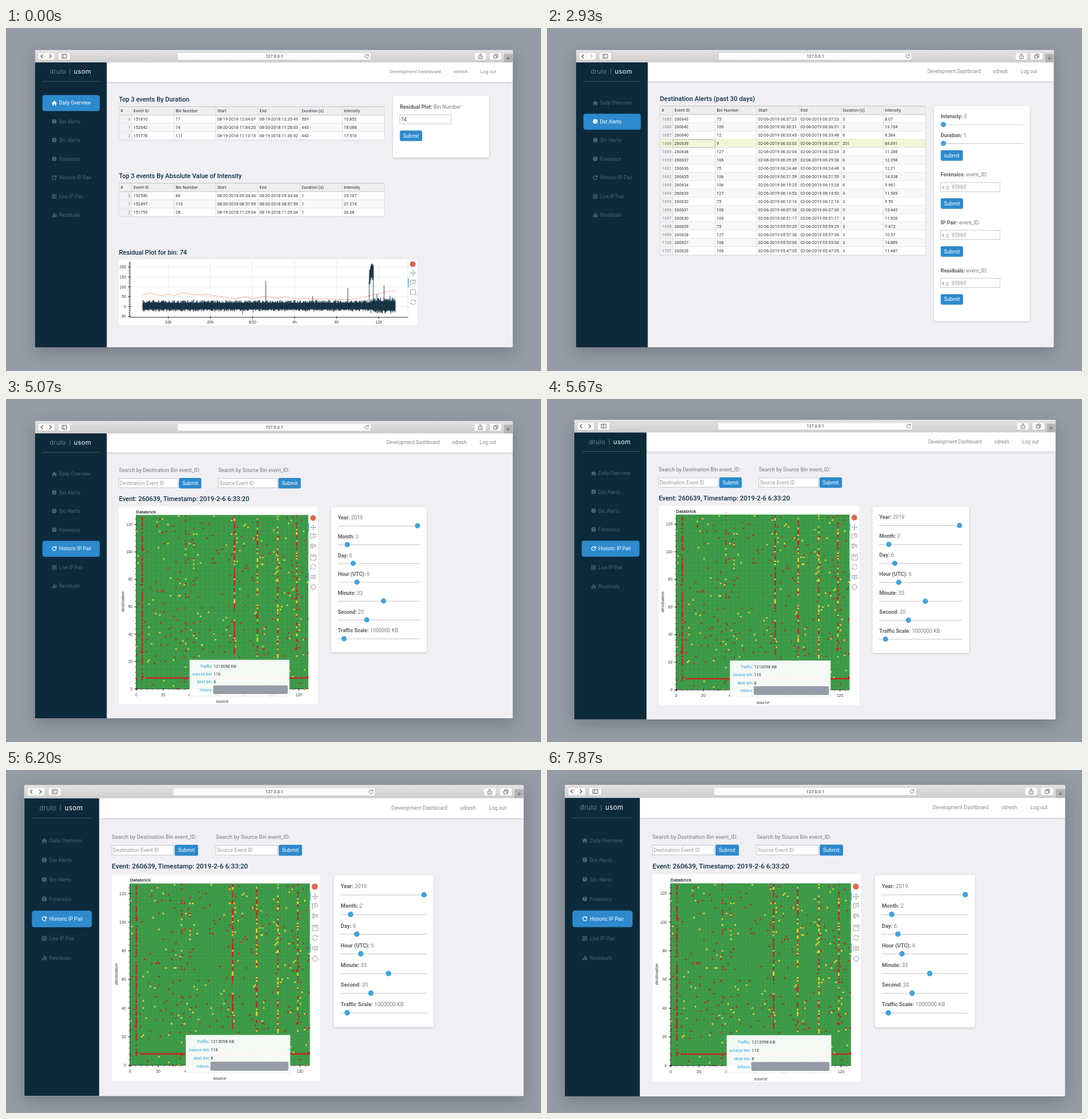
An HTML page that plays this animation: 900 by 578 pixels, repeating every 7.94 s.

```html
<!DOCTYPE html>
<html lang="en">
<head>
<meta charset="utf-8">
<title>Network dashboard</title>
<style>
  html, body { margin: 0; width: 100%; height: 100%; overflow: hidden; background: #969ca5; }
  svg { display: block; width: 100vw; height: 100vh; font-family: Roboto, sans-serif; }
  .plot { font-family: "Liberation Sans", Arial, sans-serif; }
  .logo { font-family: Inter, sans-serif; letter-spacing: .3px; }
  .card { filter: drop-shadow(0 1px 1.5px rgba(0,0,0,.2)); }
  .window { filter: drop-shadow(0 8px 13px rgba(20,30,45,.27)); }
</style>
</head>
<body>
<svg id="stage" viewBox="0 0 900 578"></svg>
<script>
const LOOP = 7940, SWITCHES = [770, 3070, 4670];
const ZOOM_START = 5444, ZOOM_TIME = 870, ZOOM = 0.0475;
const NAVY = '#0c2a3a', BLUE = '#2d8acd', KNOB = '#41a3da', DIM = '#4a6574';
const GREY = '#777b80', INK = '#33373b', BAR = '#979da6';

let seed = 7;
const rand = () => (seed = (seed * 1664525 + 1013904223) % 4294967296) / 4294967296;
const range = (n, f) => Array.from({ length: n }, (_, i) => f(i)).join('');

// y is the middle of the capital letters
const text = (x, y, s, size = 7.1, fill = INK, more = '') =>
  `<text x="${x}" y="${y + size * .355}" font-size="${size}" fill="${fill}" ${more}>${s}</text>`;
const rect = (x, y, x2, y2, fill, more = '') =>
  `<rect x="${x}" y="${y}" width="${x2 - x}" height="${y2 - y}" fill="${fill}" ${more}/>`;
const path = (d, stroke, width = 1, more = 'fill="none"') =>
  `<path d="${d}" stroke="${stroke}" stroke-width="${width}" ${more}/>`;
const dot = (x, y, r, fill) => `<circle cx="${x}" cy="${y}" r="${r}" fill="${fill}"/>`;
const BOLD = ' font-weight="700"', MID = 'text-anchor="middle"', END = 'text-anchor="end"';

const heading = (x, y, s, size = 10.9) => text(x, y, s, size, '#0c3144', 'font-weight="500"');
const card = (x, y, x2, y2) => rect(x, y, x2, y2, '#fff', 'rx="3" class="card"');
const button = (x, y, s = 'Submit', w = 37.6) =>
  rect(x, y, x + w, y + 17.7, BLUE, 'rx="2.5"') + text(x + w / 2, y + 8.8, s, 8.5, '#fff', MID);
const input = (x, y, w, s, fill = '#999') =>
  rect(x, y, x + w, y + 15.5, '#fff', 'stroke="#c3c4c8" stroke-width=".9"') + text(x + 1.8, y + 7.8, s, 8.3, fill);
const label = (x, y, name, value) =>
  text(x, y, `<tspan font-weight="700" fill="#5c6064">${name}:</tspan> ${value}`, 8.75, GREY);
const slider = (x, y, w, knob) => path(`M${x} ${y}h${w}`, '#cfcfd3', 1.2) + dot(knob, y - .3, 4.4, KNOB);

const ICONS = {
  pan: 'M-4.5 0h9M0-4.5v9M-3-1.5l-1.5 1.5 1.5 1.5M3-1.5l1.5 1.5-1.5 1.5M-1.5-3l1.5-1.5 1.5 1.5M-1.5 3l1.5 1.5 1.5-1.5',
  zoom: 'M-3 4h-1.5v-8h8.5M4.5-.8a2.6 2.6 0 1 0-5.2 0a2.6 2.6 0 1 0 5.2 0M0 1l-3 3.2',
  wheel: 'M-.5-3.5h-4v6h3M1-1.5a2 2 0 1 0-4 0a2 2 0 1 0 4 0M4.5-1.5a1.6 1.6 0 1 0-3.2 0a1.6 1.6 0 1 0 3.2 0M-1 .5l-1 3.5M3 0v3',
  box: 'M1 4h-5.5v-8h8v5M2 3.5h4M4 1.5v4',
  save: 'M-4.5-4.5h9v9h-9zM-2-4.5v3h4v-3',
  reset: 'M-4-.8a4 4 0 0 1 7.5-1.2M4 .8a4 4 0 0 1-7.5 1.2M4.3-3.5v2h-2M-4.3 3.5v-2h2',
  hover: 'M-4-3h8v5.5h-3l-1 1.5-1-1.5h-3zM-2-1.2h4M-2 .6h4',
  cross: 'M4 0a4 4 0 1 0-8 0a4 4 0 1 0 8 0M-5 0h2M3 0h2M0-5v2M0 3v2'
};
const icon = (name, x, y) =>
  `<g transform="translate(${x} ${y})">${path(ICONS[name], '#8f9296', .8)}</g>`;

function browser() {
  const box = (x, x2) => rect(x, 41.3, x2, 53.8, '#fbfbfb', 'rx="2" stroke="#c2c2c2" stroke-width=".5"');
  return rect(49, 37, 852.5, 538, '#f0eff4', 'rx="1.5" class="window"') +
    rect(49, 37, 852.5, 58, 'url(#chrome)', 'rx="1.5"') + rect(838, 43.5, 852.5, 58, '#b4b4b4') +
    path('M842 51h6M845 48v6', '#666', .9) + box(54, 82) + box(88, 108) + box(288.5, 613.5) + box(788, 808) + box(813.5, 834) +
    path('M62 44.4l-3.2 3.1 3.2 3.1', '#444', 1.1) + path('M73.2 44.4l3.2 3.1-3.2 3.1', '#444', 1.1, 'fill="none" id="forward"') +
    path('M94 44.3h8v6.5h-8zM97 44.3v6.5', '#555', .9) +
    text(451.5, 47.5, '127.0.0.1', 7, INK, MID) +
    path('M609.5 46a3 3 0 1 0 .3 2.4M609.8 44v2.3h-2.3', '#666', .8) +
    path('M796.5 46.5h-1.5v5h6v-5h-1.5M798 49.5v-6M796.3 45l1.7-1.7 1.7 1.7', '#555', .8) +
    path('M820.5 46h5v5h-5zM822.3 46v-1.8h5v5h-1.8', '#555', .8);
}

function sidebar(active) {
  const names = ['Daily Overview', 'Dst Alerts', 'Src Alerts', 'Forensics', 'Historic IP Pair', 'Live IP Pair', 'Residuals'];
  const mark = (i, y, color, back) => [
    `<path fill="${color}" d="M76.8 ${y + .3}l4.5-4.3 4.5 4.3h-1.3v3.7h-2.2v-2.6h-2v2.6h-2.2v-3.7z"/>`,
    dot(81.2, y - .5, 3.8, color) + text(81.2, y - .5, i === 3 ? '?' : '!', 6, back, MID + BOLD),
    path(`M84 ${y - 1.5}a3.2 3.2 0 1 0 .2 2.2M84.5 ${y - 3.8}v2.6h-2.6`, color, 1.2),
    range(9, k => rect(77.3 + k % 3 * 2.7, y - 3.8 + (k / 3 | 0) * 2.7, 79.4 + k % 3 * 2.7, y - 1.7 + (k / 3 | 0) * 2.7, color)),
    range(3, k => rect(77.5 + k * 2.7, y + [0, -4, -1.8][k], 79.4 + k * 2.7, y + 3.6, color))
  ][[0, 1, 1, 1, 2, 3, 4][i]];
  return rect(49, 58, 169.5, 538, NAVY) +
    text(73.5, 73.5, 'drulo', 10.8, '#8a9ba4', 'class="logo" font-weight="300"') +
    path('M107.5 68.5v10', '#6f838e', .8) +
    text(114, 73.5, 'usom', 10.8, '#fff', 'class="logo" font-weight="400"') +
    path('M61.5 90h96', '#4d6472', .8) +
    names.map((name, i) => {
      const y = 126.4 + i * 31.5, on = i === active, color = on ? '#fff' : DIM;
      return (on ? rect(61.3, y - 13.3, 157.8, y + 13.5, BLUE, 'rx="4"') : '') +
        mark(i, y, color, on ? BLUE : NAVY) + text(89.2, y, name, 8.25, color);
    }).join('');
}

function header(first) {
  const xs = first ? [645, 752, 798] : [640, 750, 797], size = first ? 7.95 : 8.2;
  return rect(169.5, 58, 852.5, first ? 91 : 90, '#fff', 'class="card"') +
    ['Development Dashboard', 'odresh', 'Log out'].map((s, i) => text(xs[i], 73.4, s, size, '#85898d')).join('');
}

function table(y, rows, pitch, chosen) {
  const xs = [190, 212, 283, 353, 424, 495, 566, 636.5];
  const names = ['#', 'Event ID', 'Bin Number', 'Start', 'End', 'Duration (s)', 'Intensity'];
  const top = y + 14.3, end = top + rows.length * pitch;
  let out = rect(190, y, 636.5, top, '#efeeef') + rect(190, top, 636.5, end, '#fff');
  rows.forEach((row, r) => {
    const a = top + r * pitch, b = a + pitch;
    out += rect(190, a, 636.5, b, r === chosen ? '#f2f6d5' : r % 2 ? '#f8f8f9' : '#fff') +
      rect(190, a, 212, b, r === chosen ? '#eef2cf' : '#f1f0f3') +
      path(`M190 ${b}H636.5`, '#c3c3c5', .7) +
      row.map((s, c) => c ? text(xs[c] + 2.2, a + 7, s) : text(209.5, a + 7, s, 7.1, '#888', END)).join('');
    if (r === chosen) out += path(`M212.4 ${a + .4}h70.4v${pitch - .8}h-70.4z`, '#666', .7, 'fill="none" stroke-dasharray="2 1.5"');
  });
  return out + xs.map(x => path(`M${x} ${y}V${end}`, '#d3d3d5', .7)).join('') +
    path(`M190 ${y}H636.5M190 ${top}H636.5`, '#b9b9bb', .8) +
    names.map((s, c) => text(xs[c] + 2.4, y + 7.2, s)).join('');
}

const split = s => s.split('\n').map(line => line.trim().split('|'));

function residualPlot() {
  const Y = v => 469.5 - v * .333;
  let noise = '';
  for (let x = 230; x < 655; x += .45) {
    const wide = x > 617 ? 1.45 : 1, tall = rand() > .96 ? 4 * rand() : 0;
    noise += `M${x.toFixed(1)} ${(469 - wide * (5.5 + 5 * rand() ** 2 + tall)).toFixed(1)}V${(469.5 + wide * (4 + 4 * rand() ** 2 + tall)).toFixed(1)}`;
  }
  for (let x = 611.2; x < 618; x += .5) {
    const top = 418 - 17 * Math.min(1, (x - 610) / 4);
    noise += `M${x} ${top - 4 + 7 * rand()}V${top + 15 + 10 * rand()}`;
  }
  noise += 'M611 469V428M618 475V400M616 397V420M437 465V426M575 465V438M636 465V434M624 465V448M646 465V451M398 470V483M516 465V452';
  const knots = [450, 447, 449, 451, 448.5, 451, 446, 448, 449, 450, 449, 451, 453, 454, 456, 455, 453, 456, 454, 452,
    454, 455, 453, 455, 456, 455, 456, 457, 456, 457, 457, 458, 457, 456, 454, 451, 449, 446, 443.5, 444];
  const hours = ['16h', '20h', '8/20', '4h', '8h', '12h'];
  return rect(190, 390, 692, 501, '#fff') + '<g class="plot">' +
    [-50, 0, 50, 100, 150, 200].map(v => path(`M208.5 ${Y(v)}H676`, '#e7e7e9', .8) +
      path(`M205 ${Y(v)}h5`, '#222', .8) + text(202, Y(v), v, 6.6, INK, END)).join('') +
    hours.map((s, i) => path(`M${273 + i * 70.8} 393V487`, '#e7e7e9', .8) + path(`M${273 + i * 70.8} 485.5v5`, '#222', .8) +
      text(273 + i * 70.8, 496, s, 6.6, INK, MID)).join('') +
    path('M208.5 393V487.5H676' + range(28, i => `M206.3 ${486.2 - i * 3.33}h2.2`), '#222', .8) +
    path('M676 393V487', '#ddd', .7) + '</g>' +
    path('M' + knots.map((y, i) => `${(230 + i * 10.9).toFixed(1)} ${y}`).join('L'), '#f2a48a', .9) +
    path(noise, NAVY, .85) +
    rect(676, 422, 677.3, 437, '#26aae1') + dot(684.3, 398, 4.8, '#e0674c') +
    ['pan', 'zoom', 'box', 'reset'].map((n, i) => icon(n, 685, [413, 429, 445, 462][i])).join('');
}

const overview = () =>
  heading(190, 120.3, 'Top 3 events By Duration', 10.7) +
  table(132.5, split(`0|151810|17|08-19-2018 12:04:07|08-19-2018 12:35:49|569|10.852
    1|152642|74|08-20-2018 11:04:20|08-20-2018 11:28:03|443|18.088
    2|151778|111|08-19-2018 11:13:15|08-19-2018 11:36:42|440|17.516`), 14) +
  heading(190, 249, 'Top 3 events By Absolute Value of Intensity', 10.7) +
  table(261.5, split(`0|152540|86|08-20-2018 09:34:46|08-20-2018 09:34:46|1|29.187
    1|152497|116|08-20-2018 08:57:59|08-20-2018 08:57:59|1|27.274
    2|151795|28|08-19-2018 11:29:04|08-19-2018 11:29:04|1|26.38`), 14) +
  heading(190, 378, 'Residual Plot for bin: 74', 10.7) + residualPlot() +
  card(651, 114.5, 812.5, 218.5) + label(662.5, 133, 'Residual Plot', 'Bin Number:') +
  input(662.5, 146, 86.5, '74', INK) + button(662.5, 172.7);

function alerts() {
  // id, bin, start, end (if later), duration, intensity
  const rows = split(`43|75|37:23||3|8.07
    42|106|36:31||3|13.164
    40|12|33:45|33:48|6|8.384
    39|9|33:03|36:37|201|64.691
    38|127|32:04||3|11.288
    37|106|29:35|29:38|6|12.398
    36|75|24:48||3|12.21
    35|106|21:59||3|14.338
    34|106|15:25|15:28|6|9.967
    33|127|14:53||3|11.549
    32|75|12:16||3|9.59
    31|106|07:36||3|13.442
    30|106|01:17||3|11.826
    29|75|59:29||3|7.472
    28|127|57:36||3|10.57
    27|106|53:06||3|14.889
    26|106|47:05||3|11.487`).map(([id, bin, a, b, time, level], i) => {
    const stamp = s => `02-06-2019 0${i < 13 ? 6 : 5}:${s}`;
    return [1685 + i, '2606' + id, bin, stamp(a), stamp(b || a), time, level];
  });
  return heading(190, 119.5, 'Destination Alerts (past 30 days)') + table(131.7, rows, 13.93, 3) +
    card(651, 131.5, 812.5, 494) +
    label(662.3, 149.3, 'Intensity', 0) + slider(662.5, 163, 138.5, 666.8) +
    label(662.3, 181.3, 'Duration', 1) + slider(662.5, 194.7, 138.5, 666.8) + button(662.3, 206, 'submit', 37.3) +
    ['Forensics', 'IP Pair', 'Residuals'].map((s, i) => {
      const y = 247.3 + i * 80.8;
      return label(662.3, y, s, 'event_ID:') + input(662.5, y + 13, 99.5, "e.g. '85860'") + button(662.3, y + 39.7);
    }).join('');
}

const search = y => [['Destination', 190], ['Source', 357.3]].map(([s, x]) =>
  text(x, y, `Search by ${s} Bin event_ID:`, 8.75, GREY) + input(x, y + 13.9, 99.2, s + ' Event ID') +
  button(x + 101, y + 12.9)).join('');

function forensics() {
  const tabs = ['Protocol', 'Dst Ip with Port', 'Dst Ip sans Port', 'Dst Port', 'Inbound',
    'Proto-Src-Dst with Ports', 'Src Ip with Port', 'Src Ip sans Port', 'Src Port', 'Outbound'];
  const title = (y, s) => text(190, y, s, 13.3, NAVY, BOLD);
  const cell = (x, y, s) => text(x, y, s, 8.7, '#60646a');
  const bar = (x, y, x2) => rect(x, y - 6.8, x2, y + 6.8, BAR, 'rx="1.5" stroke="#858b94" stroke-width=".7"');
  return search(137.8) + heading(190, 190.5, 'Forensics: Event 260639') + title(209.5, 'event_ID:') +
    text(190, 229.5, '260639', 8.7, GREY) +
    tabs.map((s, i) => {
      const x = 190 + i % 5 * 111.35, y = i < 5 ? 266.6 : 292.4;
      return rect(x, y, x + 109.2, y + 23.6, i < 2 ? BLUE : '#6ebbde', 'rx="1.5"') +
        text(x + 54.6, y + 11.8, s, 8.1, '#fff', MID + BOLD);
    }).join('') +
    title(349, 'protocol:') +
    [['17', '16.033GB', '84.8%'], ['6', '2.866GB', '15.2%']].map((row, i) =>
      row.map((s, c) => cell([190, 216.3, 271][c], 374 + i * 24, s)).join('') + path(`M190 ${386 + i * 24.3}h121`, '#dddce0')).join('') +
    title(441.3, 'dst_ip_with_port:') +
    [['9.289', '49.1', 254, 515], ['0.367', '1.9', 277, 493.5], ['0.277', '1.5', 277, 493.5], ['0.246', '1.3', 277, 515]].map((row, i) => {
      const y = 466.2 + i * 24.1;
      return bar(189.3, y, row[2]) + cell(298.3, y, row[0] + 'GB') + cell(348.3, y, row[1] + '%') +
        bar(386.3, y, row[3]) + path(`M190 ${y + 12.3}h360`, '#dddce0');
    }).join('');
}

function heatmap() {
  const X = v => 219 + v * 2.28, Y = v => 488.6 - v * 2.308;
  // column: [density, share of red]
  const busy = { 4: [.7, 1], 72: [.75, .8], 89: [.55, .5], 104: [.5, .4], 118: [.52, .72], 20: [.08, .7], 36: [.18, .7], 42: [.14, .5] };
  let red = '', yellow = '';
  for (let x = 0; x < 127; x++) for (let y = 0; y < 127; y++) {
    const [density, share] = busy[x] && y > (x === 4 ? 6 : 22) ? busy[x] : [.023, .6];
    const line = y === 8 && x > 6;
    if (!line && rand() > density) continue;
    const cell = `M${(X(x) - .2).toFixed(1)} ${(Y(y + .5) - .2).toFixed(1)}h2.5v2.5h-2.5z`;
    if (line || rand() < share) red += cell; else yellow += cell;
  }
  const ticks = [0, 20, 40, 60, 80, 100, 120];
  const ital = MID + ' font-style="italic"';
  return rect(190, 180.8, 524.5, 514.3, '#fff') + '<g class="plot">' +
    text(218.8, 189.9, 'Databrick', 7.4, INK, BOLD) +
    rect(219, 195.5, 508.5, 488.6, '#46a550') + rect(219, 195.5, 508.5, 488.6, 'url(#mesh)') +
    `<path d="${red}" fill="#c02a22"/><path d="${yellow}" fill="#ecd02f"/>` +
    path('M219 195.5V488.6H508.5' + range(32, i => `M${X(i * 4)} 488.6v2M219 ${Y(i * 4)}h-2`), '#222', .7) +
    ticks.map(v => path(`M${X(v)} 487v4.5M216 ${Y(v)}h4.5`, '#222', .8) +
      text(X(v), 498.4, v, 6.4, INK, MID) + text(212.8, Y(v), v, 6.4, INK, END)).join('') +
    text(363.7, 509.4, 'source', 7.2, INK, ital) +
    `<g transform="translate(196.7 341.6) rotate(-90)">${text(0, 0, 'destination', 7.2, INK, ital)}</g></g>`;
}

function history() {
  const settings = [['Year', 2019, 692.2], ['Month', 2, 574.1], ['Day', 6, 584], ['Hour (UTC)', 6, 590.5],
    ['Minute', 33, 635.1], ['Second', 20, 606.8], ['Traffic Scale', '1000000 KB', 568.6]];
  const tools = ['pan', 'zoom', 'wheel', 'save', 'reset', 'hover', 'cross'];
  const places = [216.5, 231.6, 248.3, 267.1, 283, 299.9, 316.8];
  const tips = [['Traffic', '1213098 KB'], ['source bin', 116], ['dest bin', 8], ['hitters', '']];
  return search(120.2) + heading(190, 167.8, 'Event: 260639, Timestamp: 2019-2-6 6:33:20') + heatmap() +
    dot(516.5, 200.6, 4.8, '#e0674c') + tools.map((n, i) => icon(n, 517, places[i])).join('') +
    rect(508.8, 209, 509.8, 223, '#26aae1') + rect(508.8, 292, 509.8, 307, '#26aae1') +
    rect(309, 439.8, 476.8, 500.4, '#fff', 'opacity=".95" stroke="#d5e5d7" stroke-width=".6"') +
    tips.map(([name, value], i) => text(347.6, 450.2 + i * 13.4, name + ':', 7, '#26a3dc', END) +
      text(349, 450.2 + i * 13.4, value, 7)).join('') +
    rect(349, 483.1, 473.6, 496.7, BAR, 'rx="1.5" stroke="#858b94" stroke-width=".7"') +
    card(546.8, 182.3, 708, 427) +
    settings.map(([name, value, knob], i) => label(558.2, 200 + i * 31.7, name, value) +
      slider(557.5, 213.9 + i * 31.7, 139.2, knob)).join('');
}

const stage = document.getElementById('stage');
stage.innerHTML = `<defs>
  <linearGradient id="chrome" x2="0" y2="1"><stop stop-color="#e3e3e3"/><stop offset="1" stop-color="#cdcdcd"/></linearGradient>
  <pattern id="mesh" x="219" y="195.5" width="2.28" height="2.308" patternUnits="userSpaceOnUse">
    <path d="M0 0H2.28M0 0V2.308" stroke="#2c8439" stroke-width=".9"/></pattern>
  <clipPath id="view"><rect x="49" y="58" width="803.5" height="480"/></clipPath></defs>
  <g id="zoom">${browser()}<g clip-path="url(#view)">` +
  [overview, alerts, forensics, history].map((page, i) =>
    `<g class="page">${page()}${header(i === 0)}${sidebar([0, 1, 3, 4][i])}</g>`).join('') + '</g></g>';

const pages = [...stage.querySelectorAll('.page')];
const zoom = document.getElementById('zoom'), forward = document.getElementById('forward');

function draw() {
  const t = performance.now() % LOOP;
  const current = SWITCHES.filter(s => t >= s).length;
  pages.forEach((p, i) => p.style.display = i === current ? '' : 'none');
  forward.setAttribute('stroke', current % 3 ? '#b5b5b5' : '#444');
  const p = Math.min(1, Math.max(0, (t - ZOOM_START) / ZOOM_TIME));
  const scale = 1 + ZOOM * (1 - Math.cos(Math.PI * p)) / 2;
  zoom.setAttribute('transform', `translate(450.6 287.5) scale(${scale}) translate(-450.6 -287.5)`);
  requestAnimationFrame(draw);
}
draw();
</script>
</body>
</html>
```
